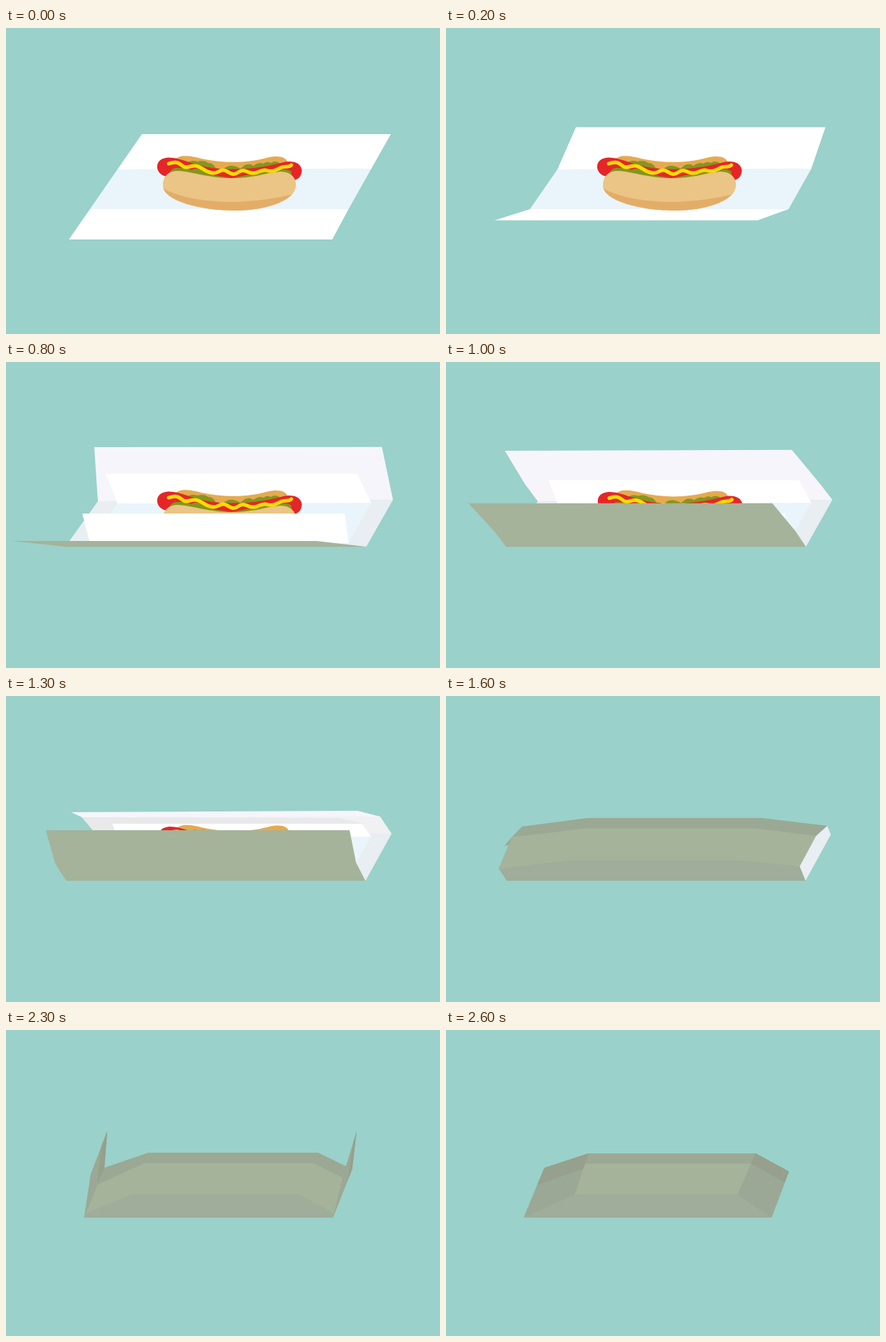
Write an HTML page with a canvas that moves like this. It is 600 px wide and 424 px high and loops after 2.7 s.

```html
<!DOCTYPE html>
<html lang="en">
<head>
<meta charset="utf-8">
<title>Wrapping a hot dog</title>
<style>
html, body { margin: 0; width: 100%; height: 100%; overflow: hidden; background: #9ad1ca; }
canvas { display: block; width: 600px; height: 424px; }
</style>
</head>
<body>
<canvas id="stage" width="600" height="424"></canvas>
<script>
const ctx = document.getElementById('stage').getContext('2d');
const LOOP = 2700, STEP = 100;
const COLOR = {
  bg: '#9ad1ca', paper: '#ffffff', paperBase: '#eaf5fb',
  lining: '#f6f5fb', wrapBase: '#e8eef2', shade: '#e9e8ea',
  top: '#a4b39a', back: '#9ba894', front: '#9fad9a', tuckBack: '#96a08c', tuck: '#9ba895'
};

const clamp = (v) => Math.min(1, Math.max(0, v));
const lerp = (a, b, p) => a + (b - a) * p;
const mix = (a, b, p) => a.map((v, i) => lerp(v, b[i], p));
const smooth = (p) => p * p * (3 - 2 * p);
const easeOut = (p) => 1 - (1 - p) ** 2;
const halfTurn = (p) => (1 - Math.cos(Math.PI * p)) / 2;
const span = (t, from, to) => clamp((t - from) / (to - from));

function poly(color, points) {
  ctx.fillStyle = color;
  ctx.beginPath();
  points.forEach(([x, y]) => ctx.lineTo(x, y));
  ctx.closePath();
  ctx.fill();
}

function shape(color, d) {
  ctx.fillStyle = color;
  ctx.fill(new Path2D(d));
}

function stroke(color, width, d) {
  ctx.strokeStyle = color;
  ctx.lineWidth = width;
  ctx.lineCap = ctx.lineJoin = 'round';
  ctx.stroke(new Path2D(d));
}

// A flap corner turns from one place to another, bulging on the way
function swing(from, to, bulge, p) {
  const arc = Math.sin(Math.PI * p);
  return mix(from, to, halfTurn(p)).map((v, i) => v + bulge[i] * arc);
}

function hotDog(drift) {
  ctx.save();
  ctx.translate(2 * drift, 1.5 * drift);
  shape('#e5aa50', 'M232 184C239 174 256 177 270 181C300 188 335 187 360 180C376 176 388 178 390 188L385 205H240Z');
  shape('#84961f', 'M248 188Q256 182 265 185Q273 182 280 187Q286 187 290 194L300 196Q306 190 314 191Q320 192 324 195L330 190Q337 187 342 191Q350 185 356 188Q361 184 366 187Q372 183 378 187L384 198L300 206L245 198Z');
  shape('#e52528', 'M224 179.5C240 179 262 191 286 194C322 198 352 194 380 187C394 182 409 186 409 198C408 209 400 212 392 211L340 214H270L222 206C213 204 209 198 209 192C209 185 215 180 224 179.5Z');
  shape('#84961f', 'M225 202Q230 192 240 194Q250 194 256 197Q262 193 270 196Q280 198 287 204L312 208L332 204Q342 201 350 202Q362 197 374 198Q384 194 394 198L396 208L320 216L228 210Z');
  stroke('#ffdc00', 5, 'M225 188C235 184 239 187 244 191C250 196 255 190 262 191C271 192 276 201 287 201C293 201 295 197 300 197C306 197 308 202 314 202.5C320 203 322 197 328 197.5C334 198 337 202 343 201C350 200 353 196 359 197C368 200 373 197 380 193.5C385 191 390 194 394.5 190');
  const bun = new Path2D('M217 218C217 203 227 197 240 198C262 200 280 208 312 208C345 208 360 200 380 199C394 199 401 208 401 218C400 242 352 253 318 253C270 253 217 240 217 218Z');
  ctx.fillStyle = '#ebc585';
  ctx.fill(bun);
  ctx.clip(bun);
  shape('#e3ad68', 'M216 221C236 234 275 241 315 241C350 240 378 235 402 229V256H216Z');
  ctx.restore();
}

function wrapBehind(t) {
  const turn = (t - 600) / 700;
  const bent = span(t, 800, 1300);
  const hingeL = [127, 193], hingeR = [535 - 2 * bent, 191];
  const tipL = swing([168, 136], [90, 161], [-40, -29], turn);
  const tipR = swing([566, 136], [486, 159], [-40, -29], turn);
  const bendL = mix(mix(tipL, hingeL, 0.66), [105, 168], bent);
  const bendR = mix(mix(tipR, hingeR, 0.66), [517, 167], bent);
  poly(COLOR.wrapBase, [hingeL, hingeR, [498 - bent, 256], [82, 256]]);
  poly(COLOR.lining, [tipL, tipR, bendR, hingeR, hingeL, bendL]);
  ctx.globalAlpha = bent ** 3;
  poly('#f1f0f3', [bendL, bendR, hingeR, hingeL]);
  poly(COLOR.shade, [bendL, [460, 169], [495, 177], [148, 177], [151, 190], [123, 190]]);
  ctx.globalAlpha = 1;
  return { tipL, tipR, bendL, bendR };
}

function wrapFront(t) {
  const turn = easeOut(span(t, 600, 1300));
  const bent = span(t, 800, 1300);
  const hingeL = [83, 256], hingeR = [498 - bent, 256];
  const tipL = swing([48, 306], [55, 186], [-43, 0], turn);
  const tipR = swing([470, 306], [475, 186], [-43, 0], turn);
  const bendL = mix(mix(tipL, hingeL, 0.66), [68, 232], bent);
  const bendR = mix(mix(tipR, hingeR, 0.66), [484, 231], bent);
  poly(tipL[1] > 256 ? COLOR.lining : COLOR.top, [tipL, tipR, bendR, hingeR, hingeL, bendL]);
}

function openScene(t) {
  const fold = smooth(span(t, 0, 500));
  const squash = span(t, 800, 1300);
  const wrapped = t >= 600;
  const lid = wrapped && wrapBehind(t);

  const backL = [154, 196], backR = [505, 195];
  const frontL = [116, 251], frontR = [473.5, 251];
  const backTips = [
    mix(swing([188, 147], [138, 155], [6, -13], fold), [147, 177], squash),
    mix(swing([532, 147], [485.5, 155], [6, -13], fold), [492, 177], squash)
  ];
  const frontTips = [
    swing([87, 293], [105.5, 210], [-28, -4], fold),
    swing([451, 293], [468.5, 210], [-28, -4], fold)
  ];
  const raised = frontTips[0][1] < frontL[1];
  const drawFront = () => poly(COLOR.paper, [...frontTips, frontR, [305, raised ? 254 : 251], frontL]);

  poly(COLOR.paperBase, [backL, backR, frontR, frontL]);
  poly(COLOR.paper, [...backTips, backR, backL]);
  if (!raised) drawFront();
  hotDog(squash);
  if (raised) drawFront();
  if (wrapped) wrapFront(t);
  if (lid && lid.tipL[1] > lid.bendL[1]) {
    poly(COLOR.back, [lid.bendL, lid.bendR, lid.tipR, lid.tipL]);
  }
}

// One long line of the parcel at one side: end, crease, shoulder
function foldLine(closedEnd, flatEnd, crease, shoulder, { press, turn, lift }) {
  const [x, y] = mix(mix(closedEnd, flatEnd, press), shoulder, turn);
  return [[x, y - lift], mix(mix(closedEnd, shoulder, 0.5), crease, press), shoulder];
}

function buildParcel(pose) {
  const { press, turn } = pose;
  const shoulderY = 169 + 2 * turn;
  const back = [
    ...foldLine([105, 181], [83, 170], [136, 191], [197, shoulderY], pose),
    ...foldLine([527, 180], [538, 171], [483 - 9 * turn, 190 + 6 * turn], [435 - 7 * turn, shoulderY], pose).reverse()
  ];
  const edge = [
    ...foldLine([73, 239], [60, 232], [109, 255], [170 + 8 * turn, 228], pose),
    ...foldLine([489, 236], [528, 232], [455 - 4 * turn, 251 + 6 * turn], [407 - 4 * turn, 228], pose).reverse()
  ];
  const puff = 6 * (1 - press);
  const ridge = back.map((point, i) => {
    const [x, y] = mix(point, edge[i], i < 2 ? lerp(0.25, 0.37, press) : 0.25);
    return [i % 5 ? x : x - puff, y];
  });
  const footL = [84, 256], footR = [497, 256];
  const base = [
    mix(footL, edge[0], press), mix(footL, [108, 260], press),
    mix(footR, [454 - 4 * turn, 260], press), mix(footR, edge[5], press)
  ];
  return { back, ridge, edge, base };
}

function tuckedEnd({ back, ridge, edge, base }, tip, crease, foot) {
  poly(COLOR.tuck, [back[crease], back[tip], ridge[tip], edge[tip], base[foot]]);
  poly(COLOR.tuckBack, [back[crease], back[tip], ridge[tip], ridge[crease]]);
}

function closedScene(t) {
  const press = span(t, 1600, 2000);
  const tuck = smooth(span(t, 2000, 2600));
  const parcel = buildParcel({ press, turn: halfTurn(tuck), lift: 30 * Math.sin(Math.PI * tuck) });
  const { back, ridge, edge, base } = parcel;
  const folded = tuck >= 0.5;
  const cut = (row) => folded ? row.slice(1, -1) : row.slice();
  const band = (color, upper, lower) => poly(color, [...cut(upper), ...cut(lower).reverse()]);

  band(COLOR.top, back, base);
  band(COLOR.back, back, ridge);
  band(COLOR.top, ridge, edge);
  band(COLOR.front, edge, base);
  if (press < 1) {
    const corner = mix([532, 192], ridge[5], press);
    poly(COLOR.wrapBase, [ridge[5], back[5], corner, base[3], edge[5]]);
    const [x, y] = ridge[0], spike = 1 - press;
    poly(COLOR.back, [[x, y], [x - 10 * spike, y + 12 * spike], [x - 3 * spike, y + 11 * spike]]);
  }
  if (folded) {
    tuckedEnd(parcel, 0, 1, 1);
    tuckedEnd(parcel, 5, 4, 2);
  }
}

function draw(now) {
  const t = Math.floor((now % LOOP) / STEP) * STEP;
  ctx.fillStyle = COLOR.bg;
  ctx.fillRect(0, 0, 600, 424);
  if (t < 1500) openScene(t);
  else closedScene(t);
}

let start;
function tick(now) {
  start ??= now;
  draw(Math.max(0, now - start));
  requestAnimationFrame(tick);
}
draw(0);
requestAnimationFrame(tick);
</script>
</body>
</html>
```
